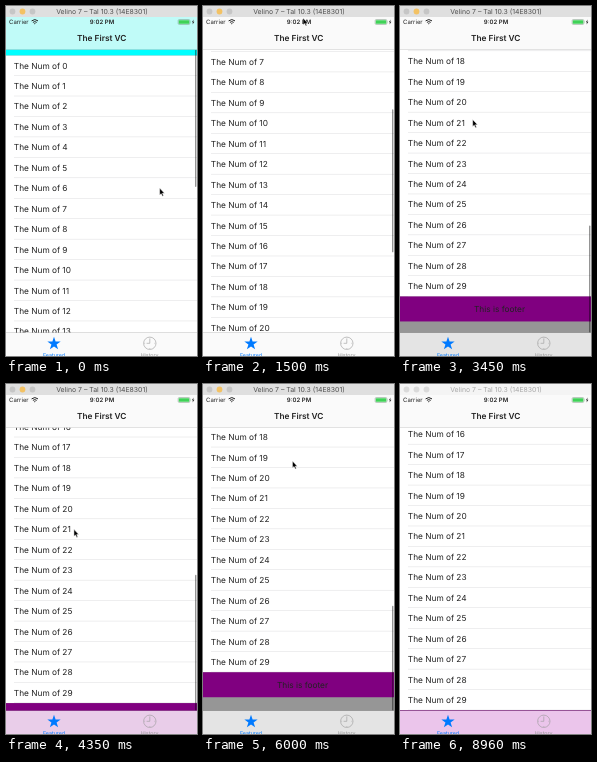
Write an HTML page that moves like this. It is 191 px wide and 350 px high and loops after 9060 ms.

```html
<!DOCTYPE html>
<html lang="en">
<head>
<meta charset="utf-8">
<title>Table with header and footer</title>
<style>
  html, body { margin: 0; width: 100%; height: 100%; overflow: hidden; background: #fff; }
  svg { display: block; width: 100vw; height: 100vh; }
  text { font-family: Inter, "Liberation Sans", sans-serif; font-size: 8.3px; fill: #222; text-rendering: geometricPrecision; }
  .mid { text-anchor: middle; }
  .small { font-size: 6px; }
  .tab { font-size: 5.3px; }
</style>
</head>
<body>
<svg id="stage" viewBox="0 0 191 350" preserveAspectRatio="none">
  <rect y="43" width="191" height="284" fill="#969696"/>
  <g id="table"></g>
  <rect id="bar" x="189" width="1.4" rx=".7" opacity=".42"/>

  <rect id="nav" y="11" width="191" height="32.8"/>
  <rect y="43.3" width="191" height=".5" opacity=".2"/>
  <text class="small" x="3" y="18.2">Carrier</text>
  <g fill="none" stroke="#222">
    <path d="M25.6 14.9Q28.8 12.2 32 14.9M26.9 16.4Q28.8 14.8 30.7 16.4"/>
    <path d="M27.9 17.3L28.8 18.5L29.7 17.3Z" fill="#222" stroke="none"/>
  </g>
  <text class="mid small" x="96" y="18.2" font-weight="600">9:02 PM</text>
  <g fill="#3fd257">
    <rect x="172.2" y="13.6" width="11.6" height="4.8" rx="1" fill="none" stroke="#6c8f74" stroke-width=".5"/>
    <rect x="172.8" y="14.2" width="10.4" height="3.6" rx=".5"/>
    <path d="M184.3 15.2q1 .8 0 1.6z"/>
    <path d="M187.6 13.6L185.9 16.3H187L186.5 18.4L188.4 15.7H187.2Z" fill="#222"/>
  </g>
  <text class="mid" x="95.7" y="35.2" font-weight="600">The First VC</text>

  <rect id="tab" y="326.7" width="191" height="24"/>
  <rect y="326.4" width="191" height=".5" opacity=".25"/>
  <path id="star" fill="#007aff"/>
  <text class="mid tab" x="48" y="350.8" style="fill:#007aff">Featured</text>
  <g fill="none" stroke="#999" stroke-width=".6">
    <circle cx="143.8" cy="337.3" r="6.2"/>
    <path d="M143.8 333V337.3H140.6M143.8 331.8v.8M143.8 342v.8M138.3 337.3h.8M148.5 337.3h.8"/>
  </g>
  <text class="mid tab" x="143.6" y="350.8" style="fill:#999">History</text>

  <rect id="frame" width="191" height="11"/>
  <g id="lights"></g>
  <text id="caption" class="mid" x="96" y="8" style="font-size:6.9px">Velino 7 – Tal 10.3 (14E8301)</text>

  <path id="cursor" d="M0 0V7L1.6 5.6L2.8 8.1L3.9 7.6L2.8 5.2H4.9Z" stroke="#fff" stroke-width=".5"/>
</svg>
<script>
const LOOP = 9060, STEP = 150, BLUR_AT = 8960;
const ROWS = 30, ROW_H = 20.45, EDGE_H = 25;
const TOP = 43.6, BOTTOM = 326.7;
const REST_TOP = 54, REST_END = -277, PULL = 39;
const BAR_H = 143, BAR_LINGER = 300;

// Each gesture eases the list (centre of its first row) and the pointer to a new place
const START = { row: REST_TOP, x: 154, y: 170 };
const GESTURES = [
  { from: -65, to: 600, row: REST_TOP + 30, x: 152, y: 235 },
  { from: 600, to: 1050, row: REST_TOP, x: 104, y: 153 },
  { from: 1050, to: 1500, row: -87.2, x: 100, y: 12 },
  { from: 1650, to: 2400, row: REST_END - 3, x: 82, y: 182 },
  { from: 2400, to: 2700, row: REST_END, x: 80, y: 187 },
  { from: 2700, to: 3750, row: REST_END - PULL, x: 72, y: 107 },
  { from: 4050, to: 4575, row: REST_END, x: 67, y: 154 },
  { from: 5200, to: 6150, row: REST_END - PULL, x: 90, y: 75 },
  { from: 6300, to: 6825, row: REST_END, x: 99, y: 77 },
  { from: 7350, to: 7650, row: REST_END, x: 79, y: 228 },
  { from: 7800, to: 8550, row: REST_END, x: 180, y: 352 }
];

const $ = id => document.getElementById(id);
const clamp = (v, lo = 0, hi = 1) => Math.min(hi, Math.max(lo, v));
const easeOut = u => 1 - (1 - u) ** 2;
const set = (el, attrs) => { for (const k in attrs) el.setAttribute(k, attrs[k]); };

function add(parent, tag, attrs, label) {
  const el = document.createElementNS("http://www.w3.org/2000/svg", tag);
  set(el, attrs);
  if (label) el.textContent = label;
  parent.append(el);
  return el;
}

function buildTable() {
  const table = $("table"), first = -ROW_H / 2, end = first + ROWS * ROW_H;
  const edge = (y, fill, label) => {
    add(table, "rect", { y, width: 191, height: EDGE_H, fill });
    add(table, "text", { x: 99.5, y: y + EDGE_H / 2 + 3, class: "mid" }, label);
  };
  add(table, "rect", { y: first, width: 191, height: ROWS * ROW_H, fill: "#fff" });
  for (let i = 0; i < ROWS; i++) {
    add(table, "text", { x: 7.8, y: i * ROW_H + 3 }, "The Num of " + i);
    add(table, "rect", { x: 8, y: first + (i + 1) * ROW_H - 0.5, width: 183, height: 0.5, fill: "#dcdcde" });
  }
  edge(first - EDGE_H, "#00ffff", "This is header");
  edge(end, "#800080", "This is footer");
}

function buildStar() {
  const pts = Array.from({ length: 10 }, (_, i) => {
    const a = (i / 5 - 0.5) * Math.PI, r = i % 2 ? 2.7 : 7;
    return (48 + r * Math.cos(a)).toFixed(2) + " " + (337.7 + r * Math.sin(a)).toFixed(2);
  });
  set($("star"), { d: "M" + pts.join("L") + "Z" });
}

function pose(t) {
  return GESTURES.reduce((p, g) => {
    const u = easeOut(clamp((t - g.from) / (g.to - g.from)));
    const mix = k => p[k] + (g[k] - p[k]) * u;
    return { row: mix("row"), x: mix("x"), y: mix("y") };
  }, START);
}

// The scroll bar shrinks when the list is pulled past an end, and hides at rest
function drawBar(t, row) {
  const travel = BOTTOM - TOP - BAR_H;
  const mid = TOP + clamp((REST_TOP - row) / (REST_TOP - REST_END)) * travel;
  const top = mid + Math.max(0, REST_END - row);
  const end = mid + BAR_H - Math.max(0, row - REST_TOP);
  const moved = Math.abs(row - pose(t - BAR_LINGER).row) > 0.01;
  const held = row < REST_TOP && row > REST_END + 1;
  set($("bar"), { y: top, height: end - top, visibility: moved || held ? "visible" : "hidden" });
}

// Translucent bars pick up the colour of what lies behind them
function tint(colour, share, empty) {
  const white = 250 * (1 - share - empty);
  return `rgb(${colour.map(v => Math.round(white + v * share + 228 * empty))})`;
}

function drawTints(row) {
  const headEnd = row - ROW_H / 2, headTop = headEnd - EDGE_H;
  const head = clamp((Math.min(headEnd, TOP) - Math.max(headTop, 11)) / 19);
  const gapTop = Math.min(1 - head, clamp((headTop - 11) / (TOP - 11)));
  set($("nav"), { fill: tint([192, 251, 248], head, gapTop) });

  const footTop = row + (ROWS - 0.5) * ROW_H, footEnd = footTop + EDGE_H;
  const foot = clamp((Math.min(footEnd, 350) - Math.max(footTop, BOTTOM)) / 23);
  const gapEnd = Math.min(1 - foot, clamp((350 - footEnd) / 23));
  set($("tab"), { fill: tint([235, 197, 235], foot, gapEnd) });
}

function drawFrame(active) {
  set($("frame"), { fill: active ? "#dfdfdf" : "#f4f4f4" });
  $("caption").style.fill = active ? "#505050" : "#a8a8a8";
  lights.forEach((el, i) => set(el, { fill: active ? (i === 1 ? "#f3c264" : "#c6c6c6") : "#dadada" }));
}

function render(ms) {
  const t = Math.floor(ms / STEP) * STEP;
  const { row, x, y } = pose(t);
  set($("table"), { transform: `translate(0 ${row})` });
  set($("cursor"), { transform: `translate(${x} ${y})` });
  drawBar(t, row);
  drawTints(row);
  drawFrame(ms < BLUR_AT);
}

buildTable();
buildStar();
const lights = [0, 1, 2].map(i => add($("lights"), "circle", { cx: 6.5 + i * 10, cy: 5.5, r: 2.9 }));

const start = performance.now();
function tick() {
  render((performance.now() - start) % LOOP);
  requestAnimationFrame(tick);
}
tick();
</script>
</body>
</html>
```
